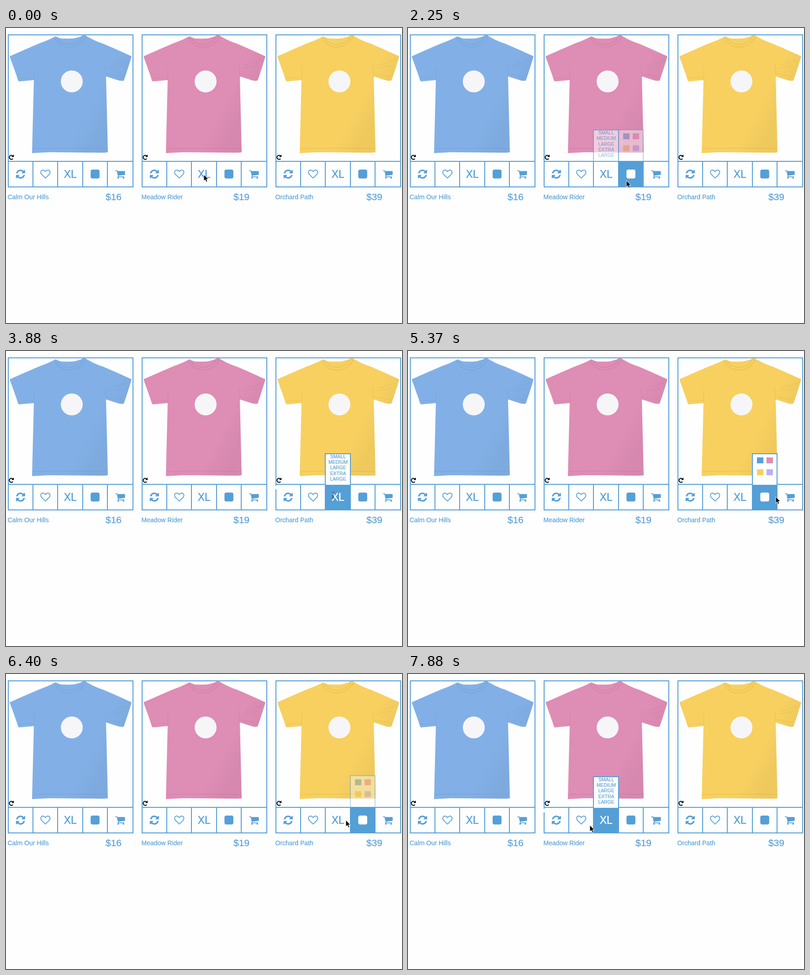
These frames come from a looping animation (867x646 px, 8000 ms). An HTML page:

```html
<!DOCTYPE html>
<html lang="en">
<head>
<meta charset="utf-8">
<title>Shirt shop</title>
<style>
  html, body { margin: 0; width: 100%; height: 100%; overflow: hidden; background: #fefefe; }
  svg { display: block; font-family: "Liberation Sans", Arial, sans-serif; }
  .cell { color: #559fd7; }
  .cell .bg { fill: #fefefe; }
  .cell.on { color: #fefefe; }
  .cell.on .bg { fill: #559fd7; }
  .line { fill: none; stroke: #559fd7; stroke-width: 2; }
  .popup { fill: #fefefe; stroke: #559fd7; stroke-width: 2; }
  .label, .price, .size { fill: #559fd7; stroke: #559fd7; stroke-width: .2; }
  .label { font-size: 14px; }
  .price { font-size: 21px; }
  .size { font-size: 10.4px; text-anchor: middle; }
  .xl { fill: currentColor; stroke: currentColor; stroke-width: .4; font-size: 23px; text-anchor: middle; }
  .fold { fill: none; stroke-width: 1.2; opacity: .5; }
</style>
</head>
<body>
<svg id="stage" width="867" height="646" viewBox="0 0 867 646">
  <defs>
    <path id="shirt" d="M105 18Q113 24 124 23Q148 25 165 16L168 15Q188 28 208 34L238 47L271 62
      Q264 86 254 115Q248 117 240 114L215 106L219 272Q216 273 205 273L90 272L53 274L57 114
      L24 117Q22 115 19 104L4 62L38 47L68 34Q88 27 105 18Z"/>
    <path id="turn" d="M10 -8.3V-2.5Q10 -1.7 9.2 -1.7H3.3Q2 -1.7 2.7 -3.1L4.6 -5Q2.6 -6.7 0 -6.7
      Q-4.2 -6.7 -6 -2.6Q-6.3 -1.7 -6.9 -1.7H-9.3Q-10 -1.7 -9.7 -2.6Q-7 -10 0 -10Q4 -10 6.9 -7.3
      L8.6 -8.9Q9.6 -9.7 10 -8.3Z"/>
    <g id="refresh" fill="currentColor">
      <use href="#turn"/><use href="#turn" transform="rotate(180)"/>
    </g>
    <path id="heart" fill="none" stroke="currentColor" stroke-width="1.7" stroke-linejoin="round"
      d="M0 8.6L-7.7 1.2C-12 -3 -10.2 -8.8 -5.5 -8.8C-2.6 -8.8 -1 -6.8 0 -5.4
      C1 -6.8 2.6 -8.8 5.5 -8.8C10.2 -8.8 12 -3 7.7 1.2Z"/>
    <text id="xl" class="xl" y="8">XL</text>
    <rect id="color" x="-10" y="-10" width="19.5" height="19.5" rx="4" fill="currentColor"/>
    <g id="cart" fill="currentColor">
      <path d="M-5.7 -6.7H10Q10.7 -6.7 10.7 -5.8V.8Q10.7 1.6 10 1.7L-3.6 3.3Z"/>
      <path d="M-9.9 -7.5H-6.7L-3.9 3.6L-4.4 5.8H8.3" fill="none" stroke="currentColor"
        stroke-width="1.7" stroke-linecap="round" stroke-linejoin="round"/>
      <circle cx="-4.2" cy="8.3" r="1.7"/><circle cx="7.5" cy="8.3" r="1.7"/>
    </g>
    <g id="redo">
      <path d="M3.4 -3.1A4.5 4.5 0 1 0 3.6 3.2" fill="none" stroke="#000" stroke-width="2"/>
      <path d="M5.6 -6V-.6H.2Z"/>
    </g>
    <linearGradient id="shade" x1=".6" y1=".5" x2="1" y2=".7">
      <stop offset=".2" stop-opacity="0"/><stop offset=".6" stop-opacity=".035"/>
    </linearGradient>
  </defs>
  <g id="cards"></g>
  <path id="arrow" d="M0 0V14.2L3.2 11.2L5.5 16.3L8 15.2L5.8 10.3H10Z" stroke="#fefefe"/>
  <path id="beam" d="M-2.5 -6.5Q0 -6.5 0 -4.5Q0 -6.5 2.5 -6.5M0 -4.5V4.5M-2.5 6.5Q0 6.5 0 4.5Q0 6.5 2.5 6.5M-1.5 1.5H1.5"
    fill="none" stroke="#123"/>
</svg>
<script>
const LOOP = 8000;
const STEP = 148.6; // time between screen updates
const FADE = 450;   // popup fade
const LAG = 80;     // hover trails the pointer
const WAKE = 700;   // hover stays off until then
const CELL = 54.5, ROW_TOP = 292, ROW_END = 348;
const ICONS = ["refresh", "heart", "xl", "color", "cart"];
const XL = 2, COLOR = 3;

const shirts = [
  { x: 4, name: "Calm Our Hills", price: "$16", at: 214, fill: "#82b0e6", dark: "#6795cc" },
  { x: 297, name: "Meadow Rider", price: "$19", at: 201, fill: "#de8db5", dark: "#bd7098" },
  { x: 590, name: "Orchard Path", price: "$39", at: 199, fill: "#f7d060", dark: "#d3aa42" }
];

// Pointer stops; it glides evenly from one to the next
const stops = [
  { t: 0, x: 433, y: 321 }, { t: 440, x: 432, y: 321 }, { t: 590, x: 432, y: 356 },
  { t: 900, x: 432, y: 356 }, { t: 1100, x: 433, y: 338 }, { t: 1650, x: 441, y: 334 },
  { t: 2250, x: 479, y: 334 }, { t: 2830, x: 500, y: 331 }, { t: 3350, x: 701, y: 318 },
  { t: 3860, x: 716, y: 316 }, { t: 4310, x: 716, y: 316 }, { t: 5350, x: 805, y: 319 },
  { t: 5450, x: 811, y: 316 }, { t: 6110, x: 811, y: 316 }, { t: 6990, x: 600, y: 328 },
  { t: 7350, x: 460, y: 330 }, { t: 7880, x: 398, y: 331 }
];

const clamp = v => Math.max(0, Math.min(1, v));
const $ = id => document.getElementById(id);

function pointer(t) {
  const next = stops.findIndex(s => s.t > t);
  if (next < 0) return stops[stops.length - 1];
  if (next === 0) return stops[0];
  const a = stops[next - 1], b = stops[next], k = (t - a.t) / (b.t - a.t);
  return { x: a.x + (b.x - a.x) * k, y: a.y + (b.y - a.y) * k };
}

function hovered(t) {
  const { x, y } = pointer(t - LAG);
  if (t < WAKE || y < ROW_TOP || y > ROW_END) return {};
  const card = shirts.findLastIndex(s => s.x <= x);
  return { card, cell: Math.floor((x - shirts[card].x) / CELL) };
}

// Each popup fades in while its cell is hovered and out afterwards
function level(t, card, cell) {
  const dt = 10;
  let v = 0;
  for (let s = 0; s < t; s += dt) {
    const h = hovered(s);
    v = clamp(v + (h.card === card && h.cell === cell ? dt : -dt) / FADE);
  }
  return v;
}

const edge = i => Math.round(i * CELL);

const sizes = ["SMALL", "MEDIUM", "LARGE", "EXTRA", "LARGE"]
  .map((s, i) => `<text class="size" x="137" y="${235 + i * 12.2}">${s}</text>`).join("");
const swatches = ["#57a0d8", "#de8db5", "#f6d05f", "#bbb0f5"]
  .map((c, i) => `<rect x="${174 + i % 2 * 21}" y="${233 + (i >> 1) * 26}" width="14" height="13" fill="${c}"/>`).join("");

const popup = (cell, content) => `<g data-popup="${cell}">
  <path class="popup" d="M${edge(cell)} 293V225H${edge(cell + 1)}V293"/>${content}</g>`;

const cell = (icon, i) => `<g class="cell">
  <rect class="bg" x="${edge(i) - 1}" y="${ROW_TOP}" width="57" height="56"/>
  <use href="#${icon}" x="${i * CELL + 27.8}" y="320"/></g>`;

const dividers = ICONS.slice(1).map((_, i) => `M${edge(i + 1)} ${ROW_TOP}V${ROW_END}`).join("");

const card = s => `<g transform="translate(${s.x})">
  <use href="#shirt" fill="${s.fill}"/>
  <use href="#shirt" fill="url(#shade)"/>
  <g class="fold" stroke="${s.dark}">
    <path d="M102 21Q112 42 136 42Q160 40 171 18M108 22Q118 36 136 36Q156 34 165 17M54 264Q130 262 218 264"/>
    <path d="M22 110L58 108M252 107L216 100M262 70L225 82M255 82L220 88M58 85L57 114M214 80L215 107" opacity=".6"/>
  </g>
  <circle cx="140" cy="117" r="24" fill="#f6f6f8"/>
  <use href="#redo" x="7.5" y="283"/>
  ${ICONS.map(cell).join("")}
  <path class="line" d="M1 15H274V${ROW_END}H1ZM1 ${ROW_TOP}H274${dividers}"/>
  <rect class="notch" x="-.5" y="295" width="3" height="8" fill="#fefefe"/>
  ${popup(XL, sizes)}${popup(COLOR, swatches)}
  <text class="label" x="-.5" y="375">${s.name}</text>
  <text class="price" x="${s.at}" y="377">${s.price}</text>
</g>`;

$("cards").innerHTML = shirts.map(card).join("");
const views = [...$("cards").children].map(el => ({
  cells: el.querySelectorAll(".cell"),
  popups: el.querySelectorAll("[data-popup]"),
  notch: el.querySelector(".notch")
}));

function draw(t) {
  const hover = hovered(t), { x, y } = pointer(t);
  views.forEach((view, c) => {
    const active = c === hover.card;
    view.cells.forEach((el, i) => el.classList.toggle("on", active && i === hover.cell));
    view.popups.forEach(el => {
      const v = level(t, c, +el.dataset.popup);
      el.setAttribute("opacity", v);
      el.setAttribute("transform", `translate(0 ${-4 * (1 - v)})`);
    });
    view.notch.style.display = active && hover.cell === XL ? "" : "none";
  });

  // A text cursor replaces the arrow over the XL letters
  const letters = hover.cell === XL ? shirts[hover.card].x + 137 : -LOOP;
  const beam = Math.abs(x - letters) < 14 && Math.abs(y - 319) < 9;
  $("arrow").style.display = beam ? "none" : "";
  $("beam").style.display = beam ? "" : "none";
  $(beam ? "beam" : "arrow").setAttribute("transform", `translate(${Math.round(x)} ${Math.round(y)})`);
}

const start = performance.now();
let shown = -1;
function loop() {
  const tick = Math.floor((performance.now() - start) % LOOP / STEP);
  if (tick !== shown) draw(tick * STEP);
  shown = tick;
  requestAnimationFrame(loop);
}
loop();
</script>
</body>
</html>
```
